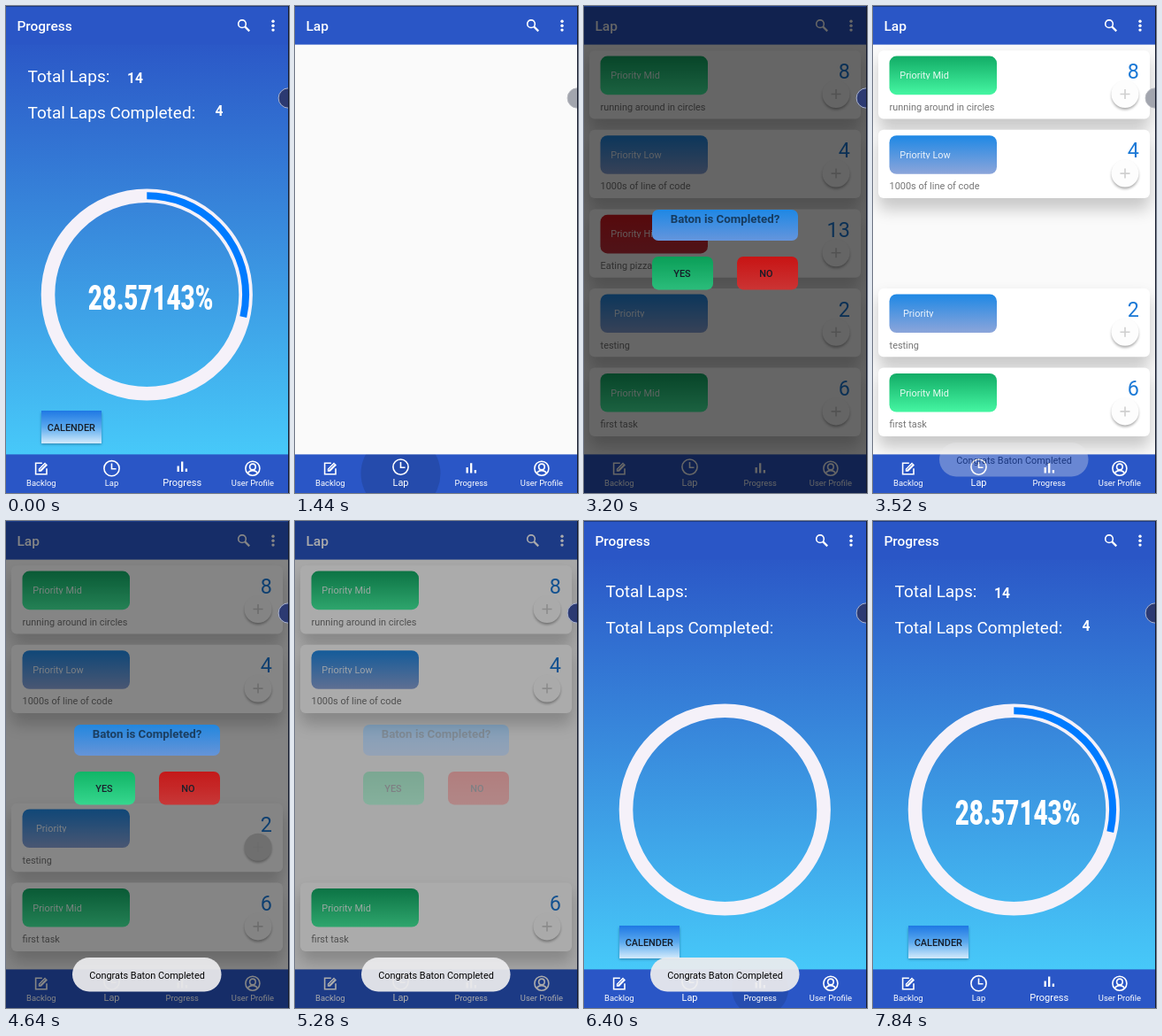
An HTML page for the animation above (9600 ms loop, 320 px wide and 550 px high).

```html
<!DOCTYPE html>
<html lang="en">
<head>
<meta charset="utf-8">
<title>Lap tracker</title>
<style>
  html, body { margin: 0; width: 100%; height: 100%; overflow: hidden; background: #fafafa; }
  svg { display: block; }
  #stage { width: 100%; height: 100%; }
  text { font-family: Roboto, "Noto Sans", sans-serif; font-size: 10.9px; }
  .mid { text-anchor: middle; }
  .title { font-size: 15.5px; font-weight: 500; fill: #fff; }
  .head { font-size: 19px; fill: #fff; }
  .value { font-size: 15.6px; font-weight: 700; fill: #fff; }
  .percent { font-size: 38px; font-weight: 900; fill: #fff; }
  .button { font-weight: 500; fill: #161c28; }
  .tag { fill: #fff; fill-opacity: .88; }
  .note { fill: #757575; }
  .count { font-size: 23.3px; fill: #1b79d6; text-anchor: end; }
  .ask { font-size: 13.3px; font-weight: 700; fill: #000; fill-opacity: .58; }
  .tab { font-size: 9.4px; fill: #fff; }
  .tab.on { font-size: 11px; }
  .line { fill: none; stroke: #fff; stroke-width: 1.6; }
</style>
</head>
<body>
<svg id="stage" viewBox="0 0 320 550"></svg>
<script>
const LOOP = 9600;
const BLUE = '#2a56c6';
const stage = document.getElementById('stage');

const text = (x, y, cls, s) => `<text x="${x}" y="${y}" class="${cls}">${s}</text>`;
const rect = (x, y, w, h, fill, more = '') =>
  `<rect x="${x}" y="${y}" width="${w}" height="${h}" fill="${fill}" ${more}/>`;
const grad = (id, ...stops) =>
  `<linearGradient id="${id}" x1="0" y1="0" x2="0" y2="1">${stops.map((c, i) =>
    `<stop offset="${i / (stops.length - 1)}" stop-color="${c}"/>`).join('')}</linearGradient>`;
const blur = (id, size) =>
  `<filter id="${id}" x="-30%" y="-60%" width="160%" height="220%"><feGaussianBlur stdDeviation="${size}"/></filter>`;

const defs = `<defs>
  ${grad('sky', '#2b58c7', '#3a90df', '#47c9f9')}
  ${grad('calBtn', '#1f78e4', '#5aa9ee', '#d3ebfc')}
  ${grad('green', '#12ac66', '#45f6a2')}
  ${grad('low', '#1e88e5', '#8ca5da')}
  ${grad('red', '#d9181f', '#c6303c')}
  ${grad('askBg', '#1e88e5', '#6595dc')}
  ${grad('yesBg', '#0cb866', '#32dc8f')}
  ${grad('noBg', '#c81414', '#cb3434')}
  ${blur('soft', 9)}${blur('small', 1.8)}
  <clipPath id="navClip"><rect y="506.4" width="320" height="44"/></clipPath>
</defs>`;

// Progress page
const R = 111.8;
const RING = 2 * Math.PI * R;
const share = 4 / 14;
const progress = `<g id="progress">
  ${rect(0, 43, 320, 464, 'url(#sky)')}
  ${text(24.5, 86.3, 'head', 'Total Laps:')}
  ${text(24.5, 127, 'head', 'Total Laps Completed:')}
  <circle cx="159.3" cy="326" r="${R}" fill="none" stroke="#f5f1f9" stroke-width="15.6"/>
  <g id="values">
    ${text(137, 87, 'value', '14')}
    ${text(236.5, 123.6, 'value', '4')}
    <circle cx="159.3" cy="326" r="${R}" fill="none" stroke="#007bff" stroke-width="8"
      stroke-dasharray="${RING * share} ${RING}" transform="rotate(-90 159.3 326)"/>
    <g transform="translate(163.5 343.3) scale(.73 1)">${text(0, 0, 'percent mid', (share * 100).toFixed(5) + '%')}</g>
  </g>
  ${rect(40, 459, 68, 36, '#0a2a50', 'opacity=".45" filter="url(#small)"')}
  ${rect(40, 457, 68, 37, 'url(#calBtn)')}
  ${text(73.8, 479.8, 'button mid', 'CALENDER')}
</g>`;

// Lap page
const cards = [
  ['green', 'Priority Mid', 'running around in circles', 8],
  ['low', 'Priority Low', '1000s of line of code', 4],
  ['red', 'Priority High', 'Eating pizza', 13],
  ['low', 'Priority', 'testing', 2],
  ['green', 'Priority Mid', 'first task', 6],
];
const top0 = 50.2, pitch = 89.6;
const each = fn => cards.map((c, i) => fn(c, i)).join('');
const place = i => `transform="translate(0 ${top0 + i * pitch})"`;

const shade = (_, i) => `<g id="shade${i}" ${place(i)}>
  ${rect(6, 10, 307, 80, '#000', 'rx="6" opacity=".2" filter="url(#soft)"')}</g>`;

const card = ([fill, tag, note, count], i) => `<g id="card${i}" ${place(i)}>
  ${rect(6, 0, 307, 77.3, '#fff', 'rx="6"')}
  ${rect(18.5, 6.4, 121.5, 43.6, `url(#${fill})`, 'rx="8"')}
  <svg x="18" y="14" width="122" height="18.6">${text(tag === 'Priority' ? 16 : 12.3, 18, 'tag', tag)}</svg>
  ${text(18.6, 67.7, 'note', note)}
  ${text(300.8, 31.6, 'count', count)}
  <circle cx="285" cy="51.5" r="15.2" opacity=".34" filter="url(#small)"/>
  <circle cx="285" cy="49.3" r="15.5" fill="#fdfdfd"/>
  <circle id="press${i}" cx="285" cy="49.3" r="15.5" opacity="0"/>
  <path d="M279.5 49.3h11M285 43.8v11" stroke="#cfcfcf" stroke-width="1.6"/>
</g>`;

const lap = `<g id="lap">${rect(0, 43, 320, 464, '#fafafa')}
  <g id="list">${each(shade)}${each(card)}</g></g>`;

// Bars
const icons = [
  `<path class="line" d="M1-6H-6.2V6.6H6.2V0"/><path d="M-3 3.6v-3L4.2-6.6l3 3L0 3.6z" fill="#fff"/>
   <path d="M-1.6 1.6L4.6-4.6" stroke="${BLUE}" stroke-width=".8"/>`,
  `<circle class="line" r="8.6"/><path class="line" d="M0-5.6V.6H5"/>`,
  `<path d="M-4.5-1.2V5.4M0-6V5.4M4.7 1.8V5.4" stroke="#fff" stroke-width="2.3"/>`,
  `<circle class="line" r="8" stroke-width="1.2"/><circle class="line" cy="-1.8" r="3.3"/>
   <path class="line" d="M-5.4 5.6C-3.6 1.4 3.6 1.4 5.4 5.6"/>`,
];
const tabs = ['Backlog', 'Lap', 'Progress', 'User Profile'];
const tabX = i => 39.8 + i * 79.7;

const bars = `${rect(0, 0, 320, 43.6, BLUE)}
  <text id="title" x="12.4" y="28.3" class="title"></text>
  <circle class="line" cx="267" cy="20.2" r="4.3" stroke-width="1.7"/>
  <path d="M270.2 23.4l5 5" stroke="#fff" stroke-width="2.2"/>
  ${[17.3, 22.2, 27.1].map(y => `<circle cx="302" cy="${y}" r="1.7" fill="#fff"/>`).join('')}
  ${rect(0, 506.4, 320, 44, BLUE)}
  <g clip-path="url(#navClip)"><circle id="ripple" cy="528" opacity="0"/></g>
  ${tabs.map((name, i) => `<g id="icon${i}">${icons[i]}</g>
    <text id="tab${i}" x="${tabX(i)}" y="542.2">${name}</text>`).join('')}`;

// Dialog, message and floating button
const dialog = `<g id="dialog">
  ${rect(77, 230, 165, 35, 'url(#askBg)', 'rx="7"')}
  ${text(159.5, 245, 'ask mid', 'Baton is Completed?')}
  ${rect(77, 283, 69, 37.4, 'url(#yesBg)', 'rx="7"')}
  ${rect(77, 283, 69, 37.4, '#000', 'rx="7" id="yes"')}
  ${text(111, 305.8, 'button mid', 'YES')}
  ${rect(173, 283, 69, 37.4, 'url(#noBg)', 'rx="7"')}
  ${text(206, 305.8, 'button mid', 'NO')}
</g>`;

const toast = `<g id="toast">
  ${rect(75, 493, 168.5, 38.4, '#ececee', 'rx="19.2" fill-opacity=".93"')}
  ${text(159.5, 516.7, 'mid', 'Congrats Baton Completed')}
</g>`;

stage.innerHTML = defs + progress + lap + bars +
  rect(0, 0, 320, 550, '#000', 'id="dim"') + dialog + toast +
  `<circle id="bubble" cx="319.3" cy="104" r="11.2"/>` +
  rect(0, 0, 320, 1, '#1b3a86') + rect(319, 0, 1, 550, '#141a2c');

const el = {};
stage.querySelectorAll('[id]').forEach(n => el[n.id] = n);
const show = (n, on) => n.setAttribute('display', on ? 'inline' : 'none');
const fade = (n, v) => { n.setAttribute('opacity', v); show(n, v > 0); };

// Each track lists [time, value]; a value holds until the next time.
const asks = [2400, 4480];
const opening = (a, b, c) => asks.flatMap(s => [[s, a], [s + 160, b], [s + 320, c]]);
const closing = (a, b) => asks.flatMap((s, i) => {
  const tap = s + 800 - i * 160;
  return [[tap, a], [tap + 160, b], [tap + 320, 0]];
});
const track = (...lists) => [[0, 0], ...lists.flat()].sort((a, b) => a[0] - b[0]);

const tracks = {
  dim: track(opening(.2, .48, .6), closing(.6, .33)),
  dialog: track(opening(.7, .95, 1), closing(1, .28)),
  yes: track(closing(.14, .1)),
  press: track(opening(.3, .16, 0)),
  toast: track([[3520, .35], [3680, .7], [3840, .92], [4000, 1],
    [5440, .9], [5600, .78], [5760, .9], [5920, 1],
    [7360, .8], [7520, .5], [7680, .2], [7840, 0]]),
  rippleR: track([[1440, 45], [1600, 52], [6400, 32], [6560, 46]]),
  ripple: track([[1440, .13], [1600, .06], [1760, 0], [6400, .11], [6560, .09], [6720, 0]]),
};
const at = (name, t) => tracks[name].reduce((v, [s, x]) => t >= s ? x : v, 0);

function draw(t) {
  const onLap = t >= 1440 && t < 6400;
  const active = t >= 1440 && t < 6560 ? 1 : 2;
  show(el.lap, onLap);
  show(el.progress, !onLap);
  show(el.list, t >= 1600);
  show(el.values, t < 1440 || t >= 6560);
  el.title.textContent = onLap ? 'Lap' : 'Progress';

  tabs.forEach((_, i) => {
    const on = i === active;
    el['tab' + i].setAttribute('class', on ? 'tab on mid' : 'tab mid');
    el['icon' + i].setAttribute('transform', `translate(${tabX(i)} ${on ? 520.6 : 522.2})`);
  });
  el.ripple.setAttribute('cx', tabX(t < 4000 ? 1 : 2));
  el.ripple.setAttribute('r', at('rippleR', t));
  fade(el.ripple, at('ripple', t));

  const gone = { 2: 3360, 3: 5280 };
  cards.forEach((_, i) => {
    const here = !(t >= gone[i]);
    show(el['card' + i], here);
    show(el['shade' + i], here);
    fade(el['press' + i], i === (t < 4000 ? 2 : 3) ? at('press', t) : 0);
  });

  for (const id of ['dim', 'dialog', 'yes', 'toast']) fade(el[id], at(id, t));

  const pale = onLap && !at('dim', t);
  el.bubble.setAttribute('fill', pale ? '#a2a5ae' : '#2c3a72');
  el.bubble.setAttribute('stroke', pale ? '#b4b6bd' : '#a9b3cf');
}

const start = performance.now();
function tick() {
  draw((performance.now() - start) % LOOP);
  requestAnimationFrame(tick);
}
tick();
</script>
</body>
</html>
```
